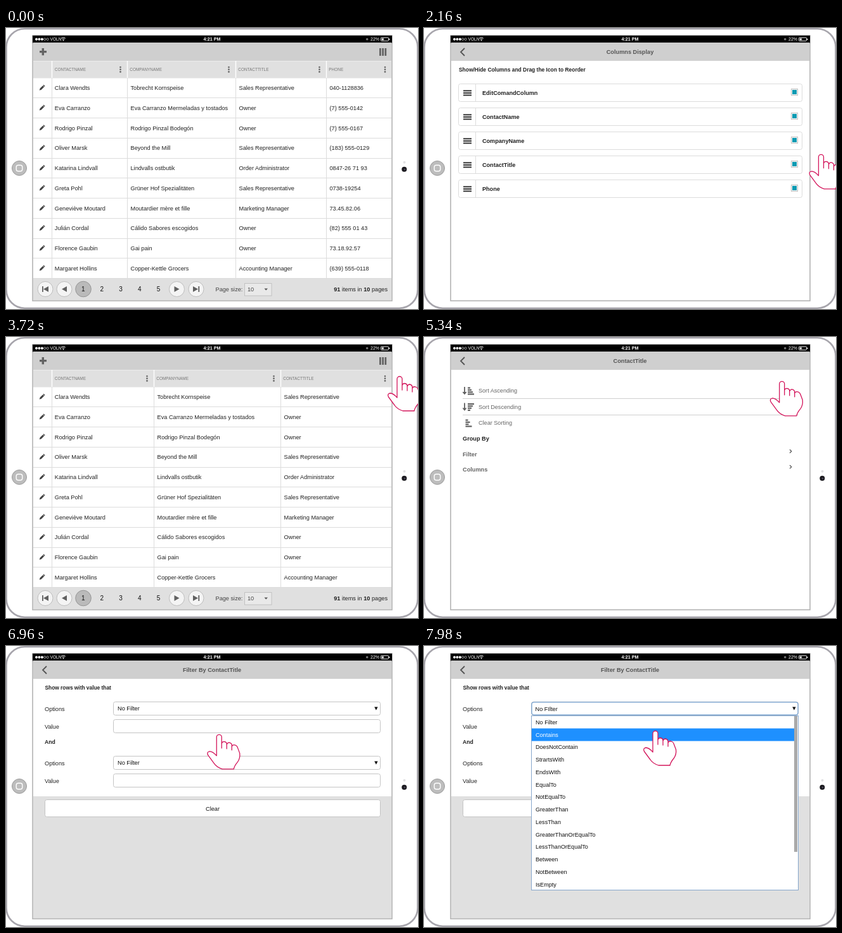
An HTML page that plays this animation: 650 px wide and 445 px high, repeating every 8000 ms.

```html
<!DOCTYPE html>
<html lang="en">
<head>
<meta charset="utf-8">
<title>Tablet grid demo</title>
<style>
html, body { margin: 0; width: 100%; height: 100%; overflow: hidden; background: #fff; }
svg { display: block; width: 650px; height: 445px; font-family: "Liberation Sans", Arial, sans-serif; }
text { white-space: pre; }
</style>
</head>
<body>
<svg id="stage" viewBox="0 0 650 445"></svg>
<script>
const LOOP = 8000;

// Drawing helpers; text is placed by its vertical middle.
const text = (x, y, s, { size = 9.2, fill = '#222', bold = false, anchor = 'start' } = {}) =>
  `<text x="${x}" y="${y + size * 0.36}" font-size="${size}" fill="${fill}" text-anchor="${anchor}"${bold ? ' font-weight="bold"' : ''}>${s}</text>`;
const rect = (x, y, w, h, fill, extra = '') =>
  `<rect x="${x}" y="${y}" width="${w}" height="${h}" fill="${fill}" ${extra}/>`;
const box = (x, y, w, h, stroke = '#c4c4c4', fill = '#fff') =>
  rect(x, y, w, h, fill, `rx="3" stroke="${stroke}"`);
const circle = (x, y, r, fill, extra = '') =>
  `<circle cx="${x}" cy="${y}" r="${r}" fill="${fill}" ${extra}/>`;
const line = (d, stroke = '#555', width = 1.8) =>
  `<path d="${d}" fill="none" stroke="${stroke}" stroke-width="${width}"/>`;
const shape = (d, fill = '#555') => `<path d="${d}" fill="${fill}"/>`;
const each = (list, fn) => list.map(fn).join('');

const columns = ['ContactName', 'CompanyName', 'ContactTitle', 'Phone'];
const people = [
  ['Clara Wendts', 'Tobrecht Kornspeise', 'Sales Representative', '040-1128836'],
  ['Eva Carranzo', 'Eva Carranzo Mermeladas y tostados', 'Owner', '(7) 555-0142'],
  ['Rodrigo Pinzal', 'Rodrigo Pinzal Bodegón', 'Owner', '(7) 555-0167'],
  ['Oliver Marsk', 'Beyond the Mill', 'Sales Representative', '(183) 555-0129'],
  ['Katarina Lindvall', 'Lindvalls ostbutik', 'Order Administrator', '0847-26 71 93'],
  ['Greta Pohl', 'Grüner Hof Spezialitäten', 'Sales Representative', '0738-19254'],
  ['Geneviève Moutard', 'Moutardier mère et fille', 'Marketing Manager', '73.45.82.06'],
  ['Julián Cordal', 'Cálido Sabores escogidos', 'Owner', '(82) 555 01 43'],
  ['Florence Gaubin', 'Gai pain', 'Owner', '73.18.92.57'],
  ['Margaret Hollins', 'Copper-Kettle Grocers', 'Accounting Manager', '(639) 555-0118']
];
const operators = ['No Filter', 'Contains', 'DoesNotContain', 'StrartsWith', 'EndsWIth', 'EqualTo',
  'NotEqualTo', 'GreaterThan', 'LessThan', 'GreaterThanOrEqualTo', 'LessThanOrEqualTo',
  'Between', 'NotBetween', 'IsEmpty'];

function tablet() {
  return rect(0.5, 1.3, 649, 442.4, '#fff', 'rx="29" stroke="#a7a5ac" stroke-width="2.6"') +
    rect(42, 12, 567, 420, '#fff', 'stroke="#b3b3b3" stroke-width="1.6"') +
    circle(21, 222, 11.5, '#bdbdbd', 'stroke="#9b9b9b"') +
    rect(16.2, 217.2, 9.6, 9.6, 'none', 'rx="3" stroke="#fff" stroke-width="1.4"') +
    circle(628.5, 212.7, 2, '#e2e2e4') + circle(628.3, 223.8, 4, '#1b1a1f') + circle(629, 224, 1.3, '#4b4858') +
    rect(42, 12, 567, 11.5, '#000') +
    each([0, 1, 2, 3, 4], i => circle(48 + i * 4.4, 17.8, 1.7, i < 3 ? '#fff' : 'none', 'stroke="#fff" stroke-width=".6"')) +
    text(69.5, 17.8, 'VOLN', { size: 6.6, fill: '#fff' }) +
    line('M87.3 16.3Q90.5 13.4 93.7 16.3M88.7 18Q90.5 16.4 92.3 18', '#fff', 1) + circle(90.5, 19.7, 0.9, '#fff') +
    text(325, 17.8, '4:21 PM', { size: 7.2, fill: '#fff', bold: true, anchor: 'middle' }) +
    circle(569.7, 17.8, 1.8, '#777') +
    text(575, 17.8, '22%', { size: 7, fill: '#fff' }) +
    rect(591.5, 15.2, 12, 5.4, 'none', 'rx="1" stroke="#fff" stroke-width=".9"') +
    rect(592.8, 16.5, 3, 2.8, '#fff') + rect(604.3, 16.8, 1.2, 2.2, '#fff');
}

const page = (title, icons) => rect(43, 23.5, 565, 407.5, '#fff') + rect(43, 23.5, 565, 28.5, '#cfcfcf') +
  text(325, 37.4, title, { fill: '#555', bold: true, anchor: 'middle' }) + icons;
const back = line('M64 32L58 38L64 44');

// Grid page: separators mark the left edge of each column.
function grid(seps) {
  const rowTop = i => 79.5 + i * 31.75;
  const arrow = (x, dir) => `M${x - 4 * dir} 409V418L${x + 4 * dir} 413.5Z`;
  const pencil = y => `<g transform="translate(56.6 ${y}) rotate(45)">` +
    shape('M-1.5 -5.6H1.5V-4.2H-1.5ZM-1.5 -3.6H1.5V2.6L0 5.6L-1.5 2.6Z', '#444') + '</g>';
  const header = each(seps, (x, i) =>
    text(x + (i ? 4.3 : 4.8), 65.5, columns[i].toUpperCase(), { size: 6.45, fill: '#777' }) +
    each([62, 65.7, 69.4], y => circle(i + 1 < seps.length ? seps[i + 1] - 10.5 : 598, y, 1.35, '#666')));
  const rows = each(people, (person, i) => {
    const y = rowTop(i) + 15.3;
    return pencil(y) + each(seps, (x, c) => text(x + (c ? 5.5 : 4.8), y, person[c])) +
      line(`M43 ${Math.round(rowTop(i + 1)) - 0.5}H608`, '#dcdcdc', 1);
  });
  return page('', shape('M56.6 32H60V36H64V39.2H60V43.2H56.6V39.2H53V36H56.6Z', '#636363') +
      each([589, 593.2, 597.4], x => rect(x, 32, 2.8, 12, '#636363'))) +
    rect(43, 52, 565, 27.5, '#e0e0e0') + line('M43 52.5H608', '#ececec', 1) + header + rows +
    each(seps, x => line(`M${x + 0.5} 52V79`, '#fff', 1.4) + line(`M${x + 0.5} 79V397`, '#dcdcdc', 1)) +
    rect(43, 397, 565, 34, '#e0e0e0') +
    each([62, 92, 269.5, 300], x => circle(x, 413.5, 12, '#f4f4f4', 'stroke="#bcbcbc"')) +
    circle(122, 413.5, 12.3, '#bababa', 'stroke="#969696"') +
    shape(arrow(63, -1) + arrow(92, -1) + arrow(269.5, 1) + arrow(299, 1) +
      'M57 409H58.8V418H57ZM303.4 409H305.2V418H303.4Z', '#606060') +
    each([1, 2, 3, 4, 5], n => text(92 + n * 29.7, 413.5, n, { size: 10, fill: '#111', anchor: 'middle' })) +
    text(330.5, 413.5, 'Page size:', { fill: '#444' }) +
    rect(376.5, 404.5, 42.5, 19.5, '#e9e9e9', 'stroke="#c2c2c2"') + text(381, 414, '10', { fill: '#444' }) +
    shape('M407.5 412.5H413L410.2 415.5Z') +
    text(602, 413.3, '<tspan font-weight="bold">91</tspan> items in <tspan font-weight="bold">10</tspan> pages', { anchor: 'end' });
}

function columnList(edited) {
  const icons = edited
    ? line('M58 33L66.5 41.5M66.5 33L58 41.5', '#555', 2.2) + line('M587 37.5L591.3 42L599.5 32', '#555', 2.2)
    : back;
  return page('Columns Display', icons) +
    text(55, 66, 'Show/Hide Columns and Drag the Icon to Reorder', { size: 8.43, bold: true }) +
    each(['EditComandColumn', ...columns], (name, i) => {
      const y = 102.5 + i * 38, checked = !edited || name !== 'Phone';
      return box(54.5, y - 14, 542, 28, '#dcdcdc') + line(`M81.5 ${y - 14}V${y + 14}`, '#dcdcdc', 1) +
        each([-3.5, 0, 3.5], d => rect(62, y + d - 0.6, 13, 2, '#333')) +
        text(92, y + 0.2, name, { size: 9.1, bold: true }) +
        rect(579.5, y - 6, 10, 10, '#fff', 'stroke="#bdbdbd"') +
        (checked ? rect(581, y - 4.5, 7, 7, '#0b9ab2') : '');
    });
}

function columnMenu() {
  const bars = (x, y, widths) => each(widths, (w, i) => rect(x, y - 6 + i * 3.3, w, 2.2, '#606060'));
  const down = y => line(`M64 ${y - 6}V${y + 4}`, '#606060', 1.8) + shape(`M60.5 ${y + 2}H67.5L64 ${y + 6.5}Z`, '#606060');
  const grey = { fill: '#666', size: 9.1 }, strong = { fill: '#666', bold: true };
  const chevron = y => line(`M577 ${y - 2.7}L579.8 ${y}L577 ${y + 2.7}`, '#555', 1.2);
  return page('ContactTitle', back) +
    down(85) + bars(69, 85.5, [4, 6, 8, 10]) + text(86, 85, 'Sort Ascending', grey) +
    down(110.5) + bars(69, 111, [10, 8, 6, 4]) + text(86, 110.7, 'Sort Descending', grey) +
    bars(65.5, 136.5, [4, 7, 5, 10]) + text(86, 136, 'Clear Sorting', grey) +
    line('M61 97.5H590M61 123.5H590', '#cfcfcf', 1) +
    text(61, 160.5, 'Group By', { bold: true }) + text(61, 185.5, 'Filter', strong) + text(61, 210, 'Columns', strong) +
    chevron(181) + chevron(205.7);
}

function filter(open) {
  const caret = y => shape(`M581.2 ${y - 2.5}H586.6L583.9 ${y + 2.8}Z`, '#111');
  const black = { fill: '#111' };
  const fields = each([99, 185], y =>
    text(61, y + 0.2, 'Options') + box(169.5, y - 10.5, 421, 21) + text(176, y, 'No Filter', black) + caret(y) +
    text(61, y + 28.2, 'Value') + box(169.5, y + 17.5, 421, 21));
  const dropdown = () =>
    box(170, 89, 420, 20, '#5b93d0') + text(175.5, 99.3, 'No FIlter', black) + caret(99) +
    rect(169.5, 110.5, 421, 276, '#fff', 'stroke="#86a6cc"') + rect(170, 130.5, 414, 20, '#1e90ff') +
    rect(584, 111, 5, 215, '#a9a9a9') +
    each(operators, (name, i) => text(176, 120.5 + i * 19.75, name, { size: 9.1, fill: i === 1 ? '#fff' : '#111' }));
  return page('Filter By ContactTitle', back) + rect(43, 238, 565, 193, '#e0e0e0') +
    text(61.5, 66.2, 'Show rows with value that', { size: 8.35, bold: true }) + fields +
    text(61, 152.3, 'And', { size: 8.6, bold: true }) +
    box(61.5, 243.5, 529, 27) + text(326, 257.8, 'Clear', { fill: '#111', anchor: 'middle' }) +
    (open ? dropdown() : '');
}

const hand = '<path id="hand" fill="#fff" stroke="#d3145a" stroke-width="1.3" stroke-linejoin="round" d="M-4 34V4.5' +
  'A4 4 0 0 1 4 4.5V22V15Q4.5 11.5 8 11.5Q12 12 12 16V23V16.5Q13 13 16 13Q20 14 20 17.5V25V19.5Q21 16 25 17' +
  'Q28.5 18 29.5 22L32.5 30Q33.5 38 29 44Q24 50 23 55H5Q-4 52 -8 46L-17.5 33Q-20 28 -15 27Q-10 27 -4 34Z"/>';

const screens = [
  [0, grid([72, 191, 362, 505])],
  [890, columnList(false)],
  [2620, columnList(true)],
  [3470, grid([72, 233, 433])],
  [5150, columnMenu()],
  [6470, filter(false)],
  [7500, filter(true)]
];

// Fingertip moves: start, end, target x, target y, linear.
const outside = [670, 145];
const moves = [
  [520, 830, 594, 36, true],
  [860, 1415, ...outside, true],
  [1770, 2540, 585, 252],
  [2580, 3310, 595, 34],
  [3440, 3720, 621, 62],
  [4780, 5060, 598, 62],
  [5157, 6276, 88, 182],
  [6440, 7480, 583, 98],
  [7520, 7980, 365, 134]
];

function fingertip(t) {
  let [x, y] = outside;
  for (const [start, end, toX, toY, linear] of moves) {
    if (t <= start) break;
    const u = Math.min(1, (t - start) / (end - start));
    const f = linear ? u : (1 - Math.cos(Math.PI * u)) / 2;
    x += (toX - x) * f;
    y += (toY - y) * f;
  }
  return [x, y];
}

const stage = document.getElementById('stage');
stage.innerHTML = tablet() + each(screens, ([, art]) => `<g class="screen">${art}</g>`) + hand;
const groups = [...stage.querySelectorAll('.screen')];
const pointer = document.getElementById('hand');

function draw(now) {
  const t = now % LOOP;
  const current = screens.filter(([start]) => start <= t).length - 1;
  groups.forEach((g, i) => g.style.display = i === current ? '' : 'none');
  pointer.setAttribute('transform', `translate(${fingertip(t)})`);
}

const begin = performance.now();
function tick() {
  draw(performance.now() - begin);
  requestAnimationFrame(tick);
}
tick();
</script>
</body>
</html>
```
